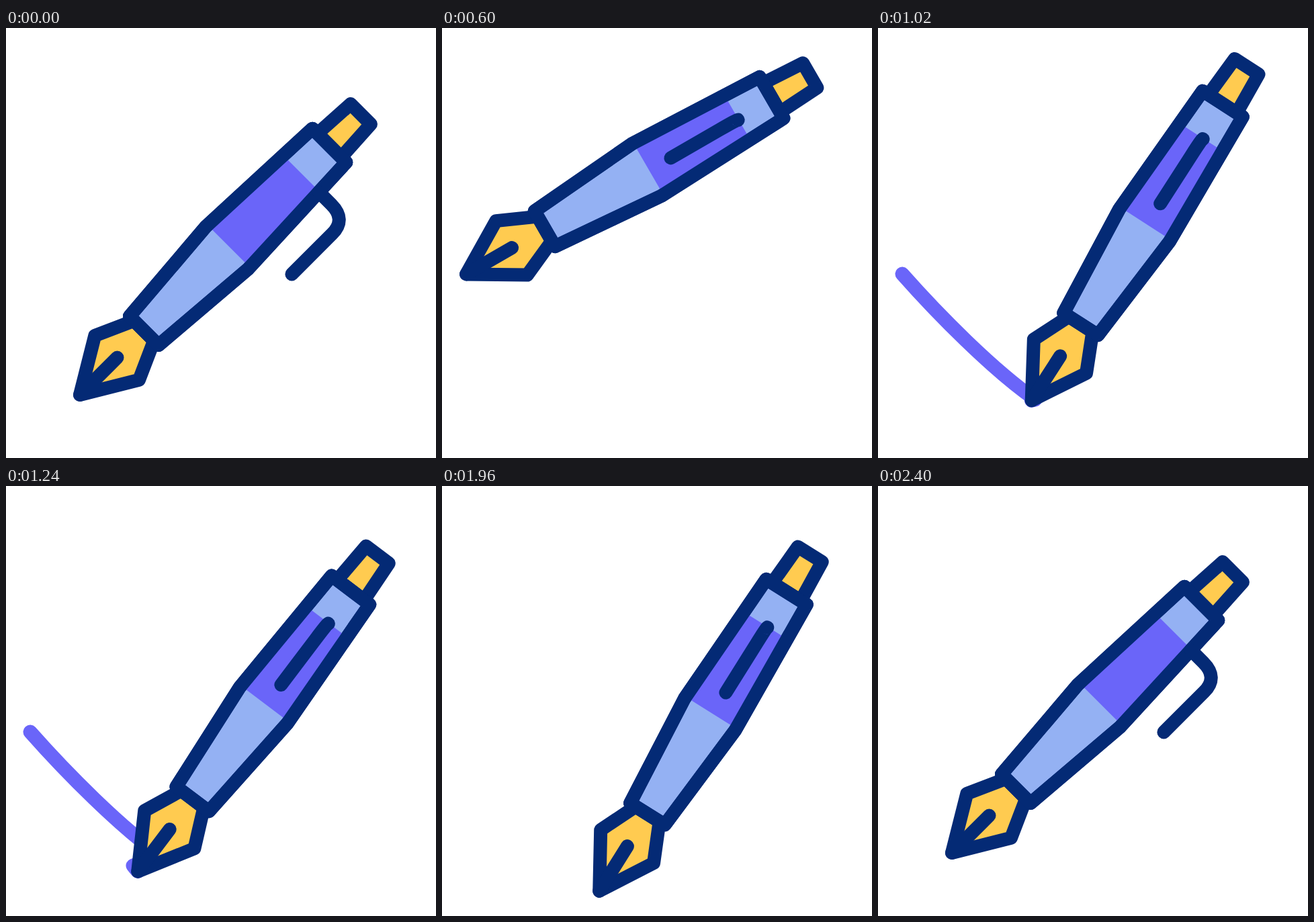
Recreate the animation shown at these times as an HTML page. Size 640 by 640 pixels, loop 2.62 s.

```html
<!DOCTYPE html>
<html lang="en">
<head>
<meta charset="utf-8">
<title>Writing pen</title>
<style>
  html, body { margin: 0; width: 100%; height: 100%; overflow: hidden; background: #fff; }
  svg { display: block; width: 100%; height: 100%; }
  path { stroke-linecap: round; stroke-linejoin: round; }
  #trail { fill: none; stroke: #6a65f9; stroke-width: 21; }
  #pen path { stroke: #042a75; stroke-width: 20; }
  .gold { fill: #ffcb50; }
  .body { fill: #94b1f3; }
  #pen .band { fill: #6a65f9; stroke: none; }
  .line { fill: none; }
</style>
</head>
<body>
<svg viewBox="0 0 640 640">
  <path id="trail"/>
  <!-- The pen lies along the x axis with its tip at the origin -->
  <g id="pen">
    <path class="gold" d="M0 0L78-46.5L135-21V21L78 46.5Z"/>
    <path class="line" d="M0 0H78.5"/>
    <path class="gold" id="cap" d="M525-25L591-21.2V21.2L525 25Z"/>
    <path class="body" d="M135-30.4L310-44.5L525-35.5V35.5L310 44.5L135 30.4Z"/>
    <path class="band" d="M313-44L466-38V38L313 44Z"/>
    <path class="line" d="M135-30.4L310-44.5L525-35.5V35.5L310 44.5L135 30.4Z"/>
    <path class="line" id="clip"/>
  </g>
</svg>
<script>
const LOOP = 2620;
const HOME = { x: 110, y: 546 }, START = { x: 36, y: 366 }, END = { x: 235, y: 603 };
const [trail, pen, cap, clip] = ['trail', 'pen', 'cap', 'clip'].map(id => document.getElementById(id));

const strokes = ['M36 366C90 427 170 508 234 553', 'Q200 561 189 565', 'Q201 582 235 603'];
const lengths = strokes.map((_, i) => {
  trail.setAttribute('d', strokes.slice(0, i + 1).join(''));
  return trail.getTotalLength();
});

const mix = (a, b, k) => a + (b - a) * k;
const ramp = (t, from, to) => Math.min(1, Math.max(0, (t - from) / (to - from)));
const ease = (t, from, to) => {
  const p = ramp(t, from, to);
  return p * p * (3 - 2 * p);
};
const writingAngle = x => 30 + 0.1508 * (x - 36) - 4.96e-5 * (x - 36) ** 2;

function drawnLength(t) {
  return lengths[0] * ease(t, 627, 978)
    + (lengths[1] - lengths[0]) * ease(t, 978, 1180)
    + (lengths[2] - lengths[1]) * ease(t, 1180, 1400);
}

function pose(t, drawn) {
  if (t < 612) {
    const k = ease(t, 200, 612), bulge = 16 * k * (1 - k);
    return {
      x: mix(HOME.x, START.x, k) - bulge,
      y: mix(HOME.y, START.y, k),
      angle: mix(45, writingAngle(START.x), k),
      turn: 1 - k
    };
  }
  if (t < 1940) {
    const { x, y } = trail.getPointAtLength(drawn);
    return { x, y, angle: writingAngle(x), turn: 0 };
  }
  const k = ease(t, 1940, 2400);
  return {
    x: mix(END.x, HOME.x, k),
    y: mix(END.y, HOME.y, k),
    angle: mix(writingAngle(END.x), 45, k),
    turn: k
  };
}

function render(t) {
  const drawn = drawnLength(t);
  const { x, y, angle, turn } = pose(t, drawn);
  const press = ease(t, 1400, 1640) - ease(t, 1670, 1860);

  trail.setAttribute('stroke-dasharray', `${drawn} 999`);
  trail.setAttribute('opacity', t < 627 ? 0 : 1 - ramp(t, 1600, 1800));
  pen.setAttribute('transform', `translate(${x} ${y + 3 * press}) rotate(${-angle})`);
  cap.setAttribute('transform', `translate(${-5.5 * press})`);

  const base = mix(3.8, 38, turn), bend = mix(3.4, 64, turn), side = mix(2.4, 96, turn);
  clip.setAttribute('d', `M465 ${base}V${bend}Q465 ${side} 435 ${side}H350`);
}

function tick() {
  render(performance.now() % LOOP);
  requestAnimationFrame(tick);
}
tick();
</script>
</body>
</html>
```
